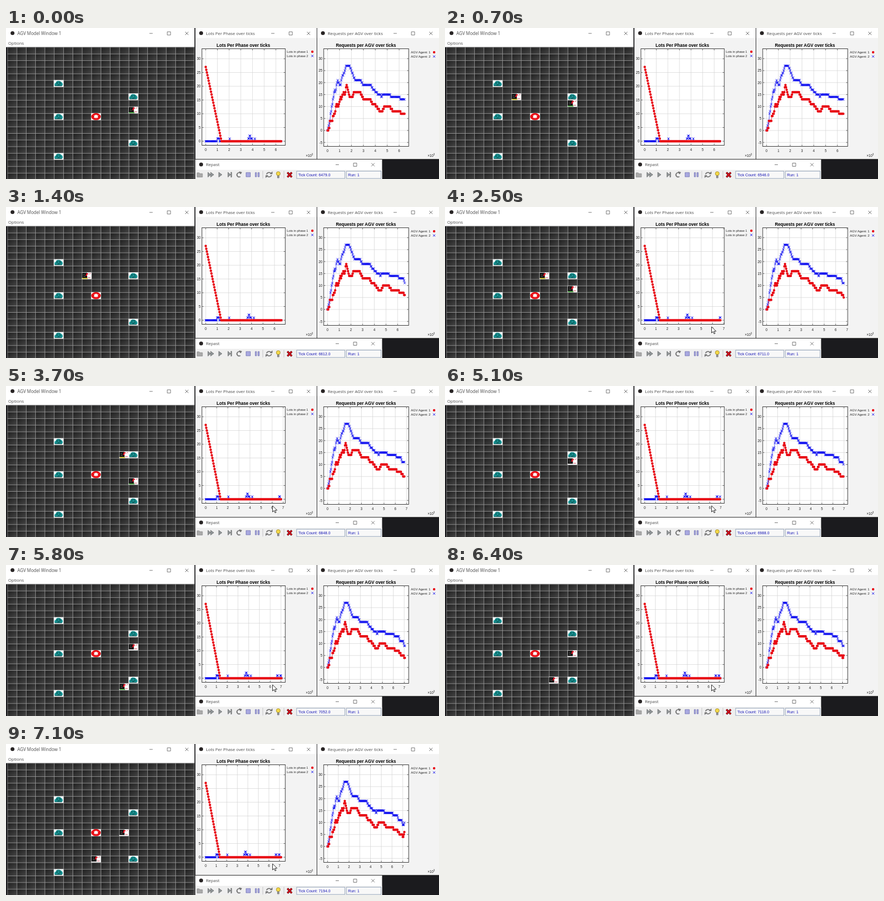
An HTML page that plays this animation: 800x280 px, repeating every 7.2 s.

```html
<!DOCTYPE html>
<html lang="en">
<head>
<meta charset="utf-8">
<title>AGV model</title>
<style>
html, body { margin: 0; width: 100%; height: 100%; overflow: hidden; background: #1b1b1e; }
svg { display: block; width: 800px; height: 280px; }
.ui { font-family: "Open Sans", "Noto Sans", sans-serif; font-size: 7.85px; fill: #4a4a4a; }
.plot { font-family: "Liberation Sans", Arial, sans-serif; font-size: 6.4px; fill: #222; }
.head { font-weight: bold; font-size: 8.15px; fill: #000; text-anchor: middle; }
.field { font-family: "Liberation Sans", Arial, sans-serif; font-size: 7.12px; fill: #1414b4; }
.ctl { fill: none; stroke: #555; stroke-width: .8; }
</style>
</head>
<body>
<svg id="stage" viewBox="0 0 800 280" xmlns="http://www.w3.org/2000/svg">
  <defs>
    <linearGradient id="shade" x1="0" y1="0" x2="1" y2="1">
      <stop offset="0" stop-color="#1d1d1d"/><stop offset="1" stop-color="#454545"/>
    </linearGradient>
    <pattern id="cell" x="2.4" y="35.4" width="17.25" height="12.28" patternUnits="userSpaceOnUse">
      <rect width="17.25" height="12.28" fill="url(#shade)"/>
      <path d="M0 .45H17.25M.45 0V12.28" stroke="#9c9c9c" stroke-width=".9"/>
    </pattern>
    <g id="machine">
      <rect x="-9" y="-6.2" width="18" height="12.4" fill="#f4f8f8"/>
      <path d="M-7.5 4V0l2-1 1-2.5 3-1.5 4 .5 3 2 2 2.500v3l-2 1.500z" fill="#189a9a"/>
      <path d="M-7 4.300H6M-4-2l3-1M0-3l4 1M-5 1l4-1.500M1 0l4 1M-2 2.500l4-.5" stroke="#0a4040" stroke-width="1.100"/>
    </g>
    <g id="depot">
      <rect x="-9" y="-6.500" width="18" height="13" fill="#fff"/>
      <ellipse rx="8.800" ry="6.500" fill="#e80c14"/>
      <path d="M-4-2h2l.5-2 1.500 1.500L1.500-4l.5 2h2.500L3 .5l1 2.500-3-1-1 2-1-2-3 1 1-2.500z" fill="#fff"/>
    </g>
    <g id="agv">
      <rect x="-9" y="-6.200" width="18" height="12.400" fill="#fff"/>
      <path d="M-8.500-5.500H1V4.500h-9.500z" fill="#141414"/>
      <path d="M-1-4.500h4v2h-2v3h-3v-2h1z" fill="#e01020"/>
      <path d="M2 3.500h5M4.500-3l3-1.500" stroke="#d04858" stroke-width="1"/>
      <path d="M-6-2h2M-6 1h3" stroke="#777" stroke-width=".8"/>
    </g>
  </defs>
  <g id="scene"></g>
  <path id="cursor" d="M492.500 222v11.500l2.700-2.500 1.900 4.200 1.900-.9-1.900-4h3.700z" fill="#fff" stroke="#111" stroke-width=".9"/>
</svg>
<script>
const NS = "http://www.w3.org/2000/svg";
const LOOP = 7200, STEP = 100;
const scene = document.getElementById("scene");
const cursor = document.getElementById("cursor");

function add(parent, tag, attrs, text) {
  const node = document.createElementNS(NS, tag);
  for (const key in attrs) node.setAttribute(key, attrs[key]);
  if (text !== undefined) node.textContent = text;
  parent.appendChild(node);
  return node;
}
const rect = (x, y, width, height, fill, extra) => add(scene, "rect", { x, y, width, height, fill, ...extra });
const label = (x, y, cls, text, extra) => add(scene, "text", { x, y, class: cls, ...extra }, text);
const line = (d, stroke, width, parent = scene) =>
  add(parent, "path", { d, fill: "none", stroke, "stroke-width": width });

function titleBar(x, y, text, close, size) {
  add(scene, "circle", { cx: x, cy: y, r: 3.6, fill: "#292525" });
  label(x + 9, y + 3.3, "ui", text, size ? { style: `font-size:${size}px` } : {});
  add(scene, "path", { class: "ctl", d:
    `M${close - 69} ${y + .5}h6M${close - 36} ${y - 2.5}h6v6h-6zM${close - 3} ${y - 2.5}l6 6m0-6l-6 6` });
}

// Piecewise lookup in [time, value, time, value, ...]
function lerp(points, t) {
  let i = 0;
  while (i < points.length - 4 && t >= points[i + 2]) i += 2;
  const [t0, v0, t1, v1] = points.slice(i, i + 4);
  return v0 + (v1 - v0) * Math.min(1, (t - t0) / (t1 - t0));
}

// Floor plan
const colX = c => 11 + 17.25 * c, rowY = r => 41.5 + 12.28 * r;
const place = (node, c, r) => node.setAttribute("transform", `translate(${colX(c)} ${rowY(r)})`);

function vehicle(cargo) {
  const g = add(scene, "g", {});
  add(g, "use", { href: "#agv" });
  const load = line("M-8 5H2", cargo, 1.7, g);
  return { g, load };
}

rect(0, 0, 348.5, 35.5, "#fff");
titleBar(12, 9.5, "AGV Model Window 1", 334, 8.15);
label(4, 30.5, "ui", "Options");
rect(2.4, 35.4, 345.6, 245, "url(#cell)");
const agvA = vehicle("#d8c820"), agvB = vehicle("#38a030");
for (const [c, r] of [[5, 5], [5, 10], [5, 16], [13, 7], [13, 14]])
  place(add(scene, "use", { href: "#machine" }), c, r);
place(add(scene, "use", { href: "#depot" }), 9, 10);

// Each stop: start time, column, row
const routeA = [[0, 5, 5], [200, 6, 6], [700, 7, 7], [1300, 8, 7], [1800, 9, 7], [2400, 10, 7],
  [3000, 11, 7], [3600, 12, 7], [4100, 13, 7], [5000, 13, 8], [5600, 13, 9], [6200, 13, 10], [6800, 12, 10]];
const routeB = [[0, 13, 9], [500, 13, 8], [1000, 13, 7], [1700, 13, 8], [2300, 13, 9], [2900, 13, 10],
  [3500, 13, 11], [4000, 13, 12], [4500, 13, 13], [5000, 13, 14], [5600, 12, 15], [6000, 11, 14],
  [6500, 10, 14], [7000, 9, 14]];

function drive(agv, route, t, loadedUntil) {
  const [, c, r] = route.filter(stop => stop[0] <= t).pop();
  place(agv.g, c, r);
  agv.load.style.display = t < loadedUntil ? "" : "none";
}

// Data, time in thousands of ticks
const lots1 = t => Math.max(0, 27 - Math.round(t / .05));
const inside = (t, a, b) => t > a - .01 && t < b + .01;
const lots2 = t => inside(t, 3.75, 3.8) ? 2
  : [[1, 1.15], [2.05, 2.05], [3.65, 3.95], [4.2, 4.2], [6.65, 6.7], [6.95, 7]].some(([a, b]) => inside(t, a, b)) ? 1 : 0;
const req1 = [0, 0, .15, 1, .2, 4, .4, 4, .45, 6, .6, 7, .75, 11, .9, 10, 1.1, 14, 1.15, 13, 1.35, 16,
  1.45, 15, 1.6, 19, 1.85, 14, 2.1, 14, 2.2, 16, 2.75, 16, 3, 13, 3.6, 13, 3.8, 11, 3.95, 11, 4.4, 8,
  4.6, 8, 4.75, 10, 5.2, 10, 5.5, 8, 6.1, 8, 6.2, 7, 6.5, 7, 6.55, 6, 6.62, 6, 6.7, 5, 6.93, 5, 7, 4, 7.05, 4, 7.15, 6];
const req2 = [0, 0, .2, 4, .25, 7, .5, 14, .6, 17, .65, 16, .85, 21, 1, 19, 1.1, 19, 1.2, 22, 1.4, 24,
  1.55, 27, 1.85, 27, 2.3, 21, 2.8, 21, 3, 19, 3.6, 19, 3.85, 17, 4.1, 16, 4.3, 15, 4.4, 15, 4.5, 14,
  4.65, 15, 5.25, 15, 5.35, 14, 6.05, 14, 6.15, 13, 6.5, 13, 6.6, 11, 6.88, 11, 6.93, 10, 7, 9, 7.1, 9, 7.15, 10];
const stair = points => t => Math.round(lerp(points, t));

function chart(o) {
  const { left, box, y0, unit } = o;
  const [x1, top, x2, bottom] = box;
  const x0 = x1 + (x2 - x1) / 22, span = (x2 - x1) / 1.1;
  rect(left, 0, o.right - left, 243, "#fff");
  rect(left, 18.5, o.right - left, 224, "#f3f3f3");
  titleBar(left + 10.5, 9.5, o.title, o.close);
  label(o.mid, 35, "plot head", o.title);
  rect(x1, top, x2 - x1, bottom - top, "#fff", { stroke: "#222", "stroke-width": .9 });
  for (let v = o.low; v <= 30; v += 5) {
    const y = y0 - v * unit;
    line(`M${x1} ${y}H${x2}`, "#d2d2d2", .7);
    line(`M${x1} ${y}h3M${x2} ${y}h-3`, "#333", .7);
    label(x1 - 2.5, y + 2.3, "plot", v, { "text-anchor": "end" });
  }
  const ticks = [];
  for (let k = 0; k < 8; k++) {
    const g = add(scene, "g", {});
    line(`M0 ${top}V${bottom}`, "#d2d2d2", .7, g);
    line(`M0 ${top}v3M0 ${bottom}v-3`, "#333", .7, g);
    add(g, "text", { class: "plot", y: bottom + 10.5, "text-anchor": "middle" }, k);
    ticks.push(g);
  }
  label(o.exp, 238.5, "plot", "×10");
  label(o.exp + 10.5, 235.5, "plot", "3", { style: "font-size:4.6px" });
  o.names.forEach((name, i) => label(o.keyX, 46.3 + 7.8 * i + o.keyDy, "plot", name, { style: `font-size:${o.keySize}px` }));
  const dot = (x, y) => `M${x} ${y}h.01`;
  const cross = (x, y) => `M${x - 2} ${y - 2}l4 4m0-4l-4 4`;
  const series = [[o.blue, "#1414f0", cross, .95], [o.red, "#e80814", dot, 4.5]].map(([value, color, mark, width], i) => {
    const wire = line("", color, .7), marks = line("", color, width);
    if (i) marks.setAttribute("stroke-linecap", "round");
    const key = line(mark(o.keyMark, 44 + 7.8 * (1 - i) + o.keyDy), color, width);
    if (i) key.setAttribute("stroke-linecap", "round");
    return { value, mark, wire, marks };
  });
  return now => {
    const scale = span / now;
    ticks.forEach((g, k) => {
      const x = x0 + k * scale;
      g.setAttribute("transform", `translate(${x.toFixed(2)} 0)`);
      g.style.display = x < x2 ? "" : "none";
    });
    for (const s of series) {
      let path = "", marks = "";
      for (let i = 0; i * .05 <= now; i++) {
        const t = i * .05, x = +(x0 + t * scale).toFixed(2), y = +(y0 - s.value(t) * unit).toFixed(2);
        path += (i ? "L" : "M") + x + " " + y;
        marks += s.mark(x, y);
      }
      s.wire.setAttribute("d", path);
      s.marks.setAttribute("d", marks);
    }
  };
}

const drawLots = chart({
  left: 350, right: 574, close: 559, title: "Lots Per Phase over ticks", mid: 438.5,
  box: [362, 38.5, 516, 217.5], y0: 210, unit: 5.1, low: 0, exp: 554,
  names: ["Lots in phase 1", "Lots in phase 2"], keyX: 519, keyMark: 566, keyDy: 0, keySize: 5.8,
  red: lots1, blue: lots2
});
const drawRequests = chart({
  left: 575, right: 800, close: 785, title: "Requests per AGV over ticks", mid: 665,
  box: [587, 38.5, 744, 219.5], y0: 190, unit: 4.44, low: -5, exp: 779,
  names: ["AGV Agent: 1", "AGV Agent: 2"], keyX: 748, keyMark: 791, keyDy: 1, keySize: 6,
  red: stair(req1), blue: stair(req2)
});

// Control panel
rect(349.5, 243.5, 345.5, 37, "#fff", { stroke: "#555", "stroke-width": .7 });
titleBar(360.5, 253, "Repast", 678);
rect(350, 263, 345, 17, "#efefef");
const shape = (d, fill, stroke = "#666") => add(scene, "path", { d, fill, stroke, "stroke-width": .7 });
shape("M353 276.500v-8h4l1 1.500h5v6.500z", "#aaa", "#888");
shape("M373 267.500l5 4.500-5 4.500zM378 267.500l6 4.500-6 4.500z", "#909698");
shape("M393 267.500l6 4.500-6 4.500z", "#909698");
shape("M410 267.500l5 4.500-5 4.500zM415.500 267.500h1.500v9h-1.500z", "#909698");
line("M433 275.500a4 4 0 1 1 0-6.500", "#777", 1.8);
shape("M431 266.500l4.500 1-2 3.500z", "#777");
shape("M443.500 268h8v8h-8z", "#a8a8e0", "#6868a8");
shape("M460.500 268h2.500v8h-2.500zM465.500 268h2.500v8h-2.500z", "#a8a8e0", "#6868a8");
line("M474.500 265V279M513.500 265V279", "#bbb", .8);
line("M481.500 271.500a4.500 4 0 0 1 8-2M490.500 272.500a4.500 4 0 0 1-8 2", "#777", 1.7);
shape("M488 270.500h4v-4zM484 273.500h-4v4z", "#777");
add(scene, "circle", { cx: 503, cy: 270, r: 3.7, fill: "#f4d848", stroke: "#8c7820", "stroke-width": .7 });
shape("M501.500 274h3v4h-3z", "#999");
line("M520 268l8 8.500m0-8.500l-8 8.500", "#300", 3.4);
line("M520 268l8 8.500m0-8.500l-8 8.500", "#d80c1c", 2.3);
rect(537, 265.500, 89, 13.500, "#f8f8f8", { stroke: "#8296b0", "stroke-width": .8 });
rect(629, 265.500, 64, 13.500, "#f8f8f8", { stroke: "#8296b0", "stroke-width": .8 });
const counter = label(540, 275, "field", "");
label(632, 275, "field", "Run: 1");
line("M348.700 0V280M574.500 0V243M349 243.300H800", "#333", .9);

const clock = [0, 6479, 1400, 6612, 2500, 6711, 3700, 6848, 4500, 6934, 5800, 7052, 7100, 7194];

function draw(t) {
  const ticks = Math.round(lerp(clock, t));
  counter.textContent = `Tick Count: ${ticks}.0`;
  drawLots(ticks / 1000);
  drawRequests(ticks / 1000);
  drive(agvA, routeA, t, 4100);
  drive(agvB, routeB, t, 6000);
  cursor.style.display = t >= 2000 ? "" : "none";
}

let shown = -1;
function tick(now) {
  const t = Math.floor(now % LOOP / STEP) * STEP;
  if (t !== shown) draw(shown = t);
  requestAnimationFrame(tick);
}
draw(0);
requestAnimationFrame(tick);
</script>
</body>
</html>
```
